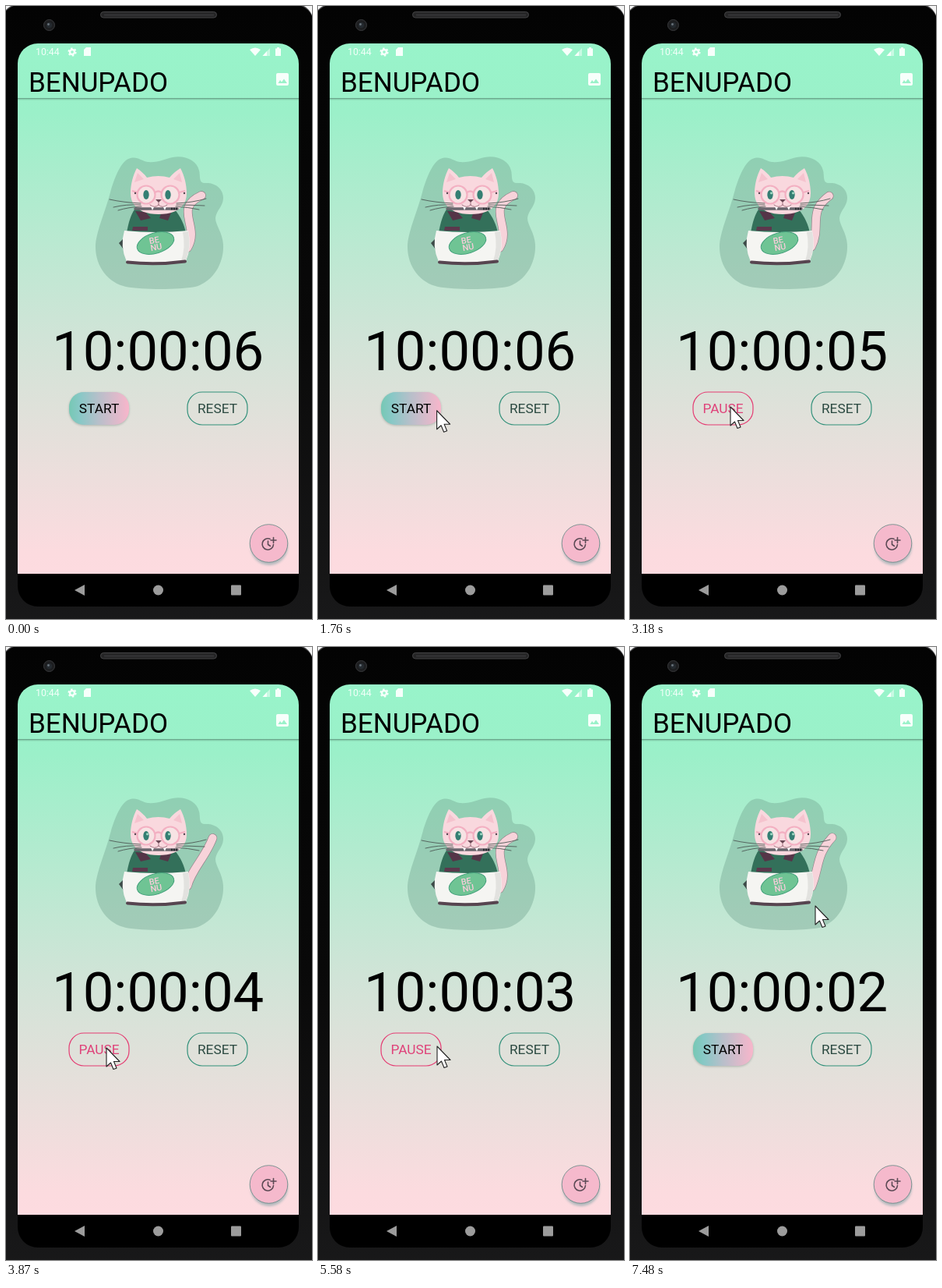
An HTML page for the animation above (8 s loop, 393 px wide and 786 px high).

```html
<!DOCTYPE html>
<html lang="en">
<head>
<meta charset="utf-8">
<title>Countdown timer</title>
<style>
html, body { margin: 0; width: 100%; height: 100%; overflow: hidden; background: #f4f4f4; }
svg { display: block; width: 100vw; height: 100vh; }
text { font-family: Roboto, sans-serif; }
.label { font-size: 17.3px; text-anchor: middle; }
.line { fill: none; stroke-linecap: round; stroke-linejoin: round; }
</style>
</head>
<body>
<svg viewBox="0 0 393 786" xmlns="http://www.w3.org/2000/svg">
  <defs>
    <linearGradient id="sky" gradientUnits="userSpaceOnUse" x1="0" y1="48" x2="0" y2="728">
      <stop offset="0" stop-color="#98f4ca"/>
      <stop offset=".13" stop-color="#9bf0c9"/>
      <stop offset=".55" stop-color="#d0e4d7"/>
      <stop offset=".96" stop-color="#fcdbdf"/>
      <stop offset="1" stop-color="#fddbe0"/>
    </linearGradient>
    <linearGradient id="body" x1="0" y1="0" x2="0" y2="1">
      <stop offset="0" stop-color="#030303"/>
      <stop offset=".5" stop-color="#090909"/>
      <stop offset="1" stop-color="#1a1a1b"/>
    </linearGradient>
    <linearGradient id="pill">
      <stop offset="0" stop-color="#76c8b4"/>
      <stop offset=".18" stop-color="#88c8c6"/>
      <stop offset=".5" stop-color="#b8bfca"/>
      <stop offset="1" stop-color="#f8b6cb"/>
    </linearGradient>
    <filter id="soft" x="-30%" y="-30%" width="160%" height="170%"><feGaussianBlur stdDeviation="1.6"/></filter>
    <clipPath id="pillClip"><rect x="81" y="495" width="77" height="42" rx="19"/></clipPath>
  </defs>

  <!-- phone -->
  <rect width="393" height="786" fill="#f4f4f4"/>
  <rect x="-6" y="-3" width="401" height="830" rx="24" fill="#4b4b4d"/>
  <rect x="-6" y="-1.500" width="401" height="830" rx="24" fill="url(#body)"/>
  <rect x="121.500" y="7.500" width="149" height="7.500" rx="3.700" fill="#252526" stroke="#444446"/>
  <path d="M126 11.500H267" stroke="#353537" stroke-width="2"/>
  <circle cx="55.500" cy="24.500" r="7" fill="#1d1e20" stroke="#38393b"/>
  <circle cx="55.500" cy="24.500" r="3.500" fill="#252b30"/>
  <circle cx="54.500" cy="23.500" r="1.400" fill="#69737b"/>
  <rect x="15" y="48" width="361" height="722" rx="26" fill="#000"/>
  <path d="M15 728V74A26 26 0 0 1 41 48H350A26 26 0 0 1 376 74V728Z" fill="url(#sky)"/>

  <!-- status bar -->
  <g fill="#f7fffb">
    <text x="38" y="63" font-size="12.300" opacity=".95">10:44</text>
    <circle cx="85" cy="59" r="3" fill="none" stroke="#f7fffb" stroke-width="2.400"/>
    <circle cx="85" cy="59" r="4.700" fill="none" stroke="#f7fffb" stroke-width="1.800" stroke-dasharray="2.450 2.470"/>
    <path d="M103 53H109V64H100V56Z"/>
    <path d="M313 56Q320 51 327 56L320 64Z"/>
    <path d="M339 54V64H329.500Z" opacity=".5"/>
    <path d="M335 58V64H329.500Z"/>
    <path d="M346 54.500H348V53H351V54.500H353V64H346Z"/>
    <path fill-rule="evenodd" d="M349 86H361Q363 86 363 88V100Q363 102 361 102H349Q347 102 347 100V88Q347 86 349 86ZM349.500 99H361L357 93.500 354 97.500 352 95Z"/>
  </g>
  <text x="29" y="110" font-size="35">BENUPADO</text>
  <g fill="#3f6152">
    <rect x="15" y="118" width="361" height="1" opacity=".5"/>
    <rect x="15" y="119" width="361" height="1" opacity=".25"/>
    <rect x="15" y="120" width="361" height="1" opacity=".1"/>
  </g>

  <!-- cat -->
  <path fill="#6ea08c" fill-opacity=".4" d="M115 306C116 289 128 262 134 239C139 221 148 197 160 195C170 193 174 199 182 200C196 201 204 196 214 194C230 191 245 198 248 211C250 219 247 227 256 227C268 226 279 234 279 246C279 257 270 262 269 272C269 281 278 290 279 306C280 329 267 353 243 360C221 364 176 364 154 360C131 355 114 334 115 306Z"/>
  <path id="tailEdge" class="line" stroke="#927f87" stroke-width="11.500"/>
  <path id="tail" class="line" stroke="#f7d3da" stroke-width="10.200"/>
  <path d="M152 297L145 304 151 312Z" fill="#3d4a48"/>
  <path d="M165 261H217C224 270 229 280 231 291H155C157 279 160 268 165 261Z" fill="#33705a"/>
  <path d="M166 263L179 264 186 272 173 275ZM213 263L200 264 197 272 208 275Z" fill="#553548"/>
  <path d="M163 283H182V288H162Z" fill="#5b384c"/>
  <path d="M152 288Q193 292 234 288Q239 309 231 327Q192 332 155 328Q146 308 152 288Z" fill="#f5f5f2"/>
  <path d="M227 290Q231 309 225 327L231 326Q238 309 234 289Z" fill="#e2e2df"/>
  <path class="line" d="M156 328.500Q192 332.500 230 327.500" stroke="#574550" stroke-width="4"/>
  <ellipse cx="192" cy="304" rx="24.500" ry="13" transform="rotate(-17 192 304)" fill="#6fc494" stroke="#45a27c"/>
  <g fill="#f7ccd9" font-size="11" font-weight="500" text-anchor="middle" transform="rotate(-10 192 304)">
    <text x="191" y="304">BE</text><text x="192" y="313">NU</text>
  </g>
  <path d="M160 240C160 229 163 217 168 208C173 211 178 216 181 220Q196 216 210 220C214 215 219 211 224 208C229 217 232 229 232 240C232 258 218 267 196 267C173 267 160 257 160 240Z" fill="#f9d8de"/>
  <path d="M165 226L169 214 177 222ZM226 226L223 214 215 222Z" fill="#f5c3ce"/>
  <path class="line" d="M166 260H220" stroke="#68656c" stroke-width="3.500"/>
  <path d="M212 260H220" stroke="#2d2c31" stroke-width="2.500" stroke-dasharray="2 1"/>
  <g fill="#f7e3e4" stroke="#f3b0c2" stroke-width="2.200">
    <circle cx="180" cy="242" r="11.500"/><circle cx="211" cy="242" r="11.500"/>
    <path d="M191.500 239Q195.500 236 199.500 239M168.500 239L162 237M222.500 239L230 237" fill="none"/>
  </g>
  <g fill="#347f73"><ellipse cx="180" cy="242" rx="3.700" ry="6"/><ellipse cx="208" cy="242" rx="3.700" ry="6"/></g>
  <g id="glint" fill="#a9e5cc"><circle cx="181.500" cy="240" r="1.400"/><circle cx="209.500" cy="240" r="1.400"/></g>
  <path d="M192 248H200L196 252Z" fill="#6b4855"/>
  <path class="line" d="M196 252V255M196 255Q191 260 185 255M196 255Q201 260 207 255" stroke="#a47582" stroke-width="1"/>
  <path d="M186 257L188 262 190 258ZM202 258L204 262 206 257Z" fill="#fff"/>
  <g class="line" stroke="#4f5b56" stroke-width=".9">
    <path d="M173 253Q151 252 133 248M173 255Q154 254 138 258M174 257Q157 258 144 262"/>
    <path d="M219 253Q240 252 257 247M219 255Q237 255 255 256M218 257Q234 258 248 261"/>
  </g>
  <circle cx="166" cy="240" r="1.200" fill="#574550"/><circle cx="229" cy="240" r="1.200" fill="#574550"/>

  <!-- timer and buttons -->
  <text id="clock" x="59" y="467" font-size="70.600"></text>
  <g id="start">
    <rect id="shadow" x="81" y="496" width="77" height="42" rx="19" fill="#6b7d77" filter="url(#soft)"/>
    <rect x="81" y="495" width="77" height="42" rx="19" fill="url(#pill)"/>
    <text class="label" x="119.500" y="522">START</text>
  </g>
  <g id="pause">
    <rect x="81" y="495" width="77" height="42" rx="19" fill="none" stroke="#e53c73" stroke-width="1.200"/>
    <text class="label" x="119.500" y="522" fill="#df437a">PAUSE</text>
  </g>
  <g clip-path="url(#pillClip)"><circle id="ripple" fill="#fff"/></g>
  <rect x="233" y="495" width="77" height="42" rx="19" fill="none" stroke="#33917b" stroke-width="1.200"/>
  <text class="label" x="271.500" y="522" fill="#2c4a42">RESET</text>

  <!-- add button -->
  <circle cx="338" cy="693" r="24" fill="#7b9fa3" opacity=".55" filter="url(#soft)"/>
  <circle cx="337.500" cy="689" r="24.300" fill="#f5b9cc" stroke="#4d7d78" stroke-width=".7"/>
  <g class="line" stroke="#5c4a55" stroke-width="1.600">
    <path d="M339 683.300A7.200 7.200 0 1 0 343.500 690.500M336.500 686V690.500L339.500 692.500"/>
    <path d="M343.500 681.500V688.500M340 685H347"/>
  </g>

  <!-- navigation -->
  <g fill="#9c9c9c">
    <path d="M101 742V756L88 749Z"/><circle cx="195.500" cy="749" r="6.500"/>
    <rect x="289" y="742.500" width="13" height="13" rx="1"/>
  </g>
  <path id="cursor" d="M0 0V24L5.500 19 9 27.500 13 26 9.500 17.500H17Z" fill="#fff" stroke="#222" stroke-width="1.100" stroke-linejoin="round"/>
</svg>
<script>
const LOOP = 8000, RUN = 2720, STOP = 5890;
const $ = id => document.getElementById(id);
const set = (id, attrs) => {
  for (const name in attrs) $(id).setAttribute(name, attrs[name]);
};
const clamp = v => Math.max(0, Math.min(1, v));
const mix = (a, b, k) => a + (b - a) * k;

// time, x, y of the pointer tip
const trail = [
  [390, 369, 738], [860, 119, 499], [1060, 119, 499], [1130, 156.5, 490],
  [1200, 156.5, 490], [1330, 137, 479], [1500, 112, 492], [1700, 139, 515],
  [1830, 168, 523], [1900, 172, 534], [2110, 129, 514], [4750, 129, 514],
  [4820, 115.5, 485], [4890, 115.5, 485], [4990, 98, 500], [5170, 125, 540],
  [5400, 166, 526], [5580, 153, 512], [7060, 153, 512], [7480, 238, 332]
];

function pointer(t) {
  const i = trail.findIndex(key => key[0] > t);
  if (i < 0) return trail[trail.length - 1].slice(1);
  const a = trail[Math.max(0, i - 1)], b = trail[i];
  const k = clamp((t - a[0]) / (b[0] - a[0]));
  return [mix(a[1], b[1], k), mix(a[2], b[2], k)];
}

function swing(t) {
  const now = Math.min(t, STOP);
  const wave = (1 - Math.cos((now - 5590) / 1100 * 2 * Math.PI)) / 2;
  return wave * clamp((now - RUN) / 280);
}

function drawTail(k) {
  const rest = [233, 310, 250, 282, 214, 260, 251, 243];
  const out = [233, 306, 238, 285, 258, 270, 266, 245];
  const p = rest.map((v, i) => mix(v, out[i], k));
  const d = `M${p[0]} ${p[1]}C${p.slice(2).join(" ")}`;
  set("tailEdge", { d });
  set("tail", { d });
}

function drawRipple(t) {
  const second = t > 4000;
  const begin = second ? 5720 : 2380;
  const age = t - begin;
  const grow = clamp(age / 400);
  const shown = age >= 0 && age < 600;
  set("ripple", {
    cx: second ? 153 : 129, cy: second ? 512 : 514, r: mix(18, 75, grow),
    fill: second ? "#e53c73" : "#fff",
    opacity: shown ? 0.12 * (1 - clamp((age - 200) / 400)) : 0
  });
}

function draw(t) {
  const running = t >= RUN && t < STOP;
  const ticks = t < RUN ? 0 : Math.min(4, 1 + Math.floor((t - RUN) / 1000));
  $("clock").textContent = `10:00:0${6 - ticks}`;
  set("start", { display: running ? "none" : "inline" });
  set("pause", { display: running ? "inline" : "none" });
  set("glint", { opacity: t >= RUN ? 1 : 0 });
  const lift = t < RUN ? clamp((t - 2480) / 100) : 0;
  set("shadow", { y: mix(496, 498, lift), opacity: mix(0.45, 0.7, lift) });
  drawTail(swing(t));
  drawRipple(t);
  const [x, y] = pointer(t);
  set("cursor", { transform: `translate(${x} ${y})`, display: t < 390 ? "none" : "inline" });
}

const origin = performance.now();
function tick() {
  draw((performance.now() - origin) % LOOP);
  requestAnimationFrame(tick);
}
tick();
</script>
</body>
</html>
```
